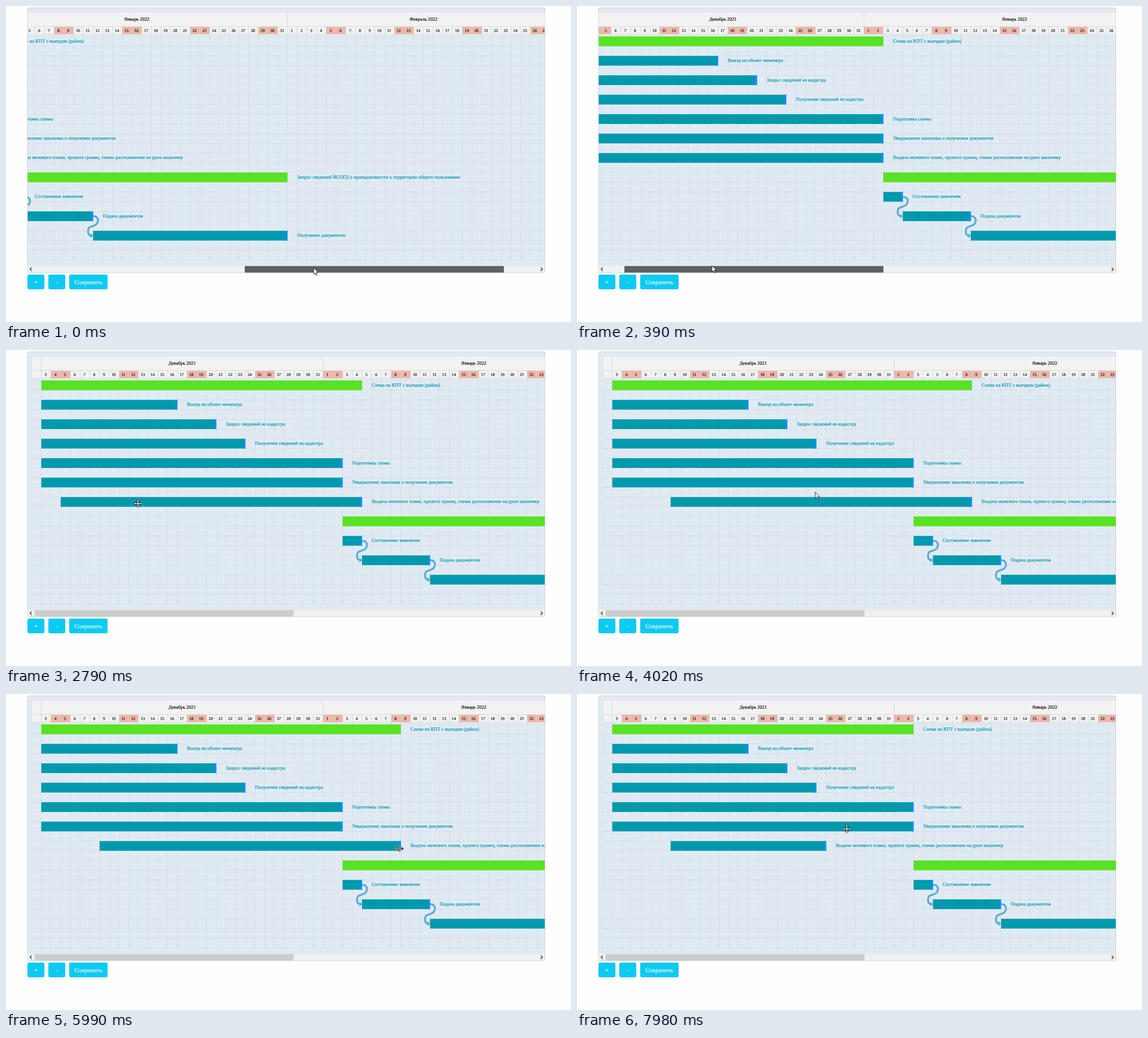
An HTML page for the animation above (8 s loop, 1001 by 560 pixels).

```html
<!DOCTYPE html>
<html lang="ru">
<head>
<meta charset="utf-8">
<title>Диаграмма работ</title>
<style>
html, body { margin: 0; width: 100%; height: 100%; overflow: hidden; background: #fefefe; }
svg { display: block; font-family: "Liberation Serif", "Times New Roman", serif; text-rendering: geometricPrecision; }
.month, .day, .button text { text-anchor: middle; stroke-width: .15; }
.month, .day { stroke: #000; }
.month { font-size: 8.4px; }
.day { font-size: 7.3px; }
.label { font-size: 8.6px; fill: #0097ab; stroke: #0097ab; stroke-width: .2; }
.head { fill: #f2f2f2; stroke: #cfd3d6; stroke-width: .6; }
.off { fill: #efb5a8; }
.grid { fill: none; stroke: #cfd8e0; stroke-width: .6; }
.task { fill: #0099ad; }
.group { fill: #57e223; }
.grip { fill: #0a91f6; }
.link { fill: none; stroke: #5cadd4; stroke-width: 3.4; }
.tip { fill: #5cadd4; }
.button rect { fill: #0dcaf2; }
.button text { font-size: 10.9px; fill: #fff; stroke: #fff; }
.chevron { fill: none; stroke: #505050; stroke-width: 1.5; }
#arrow, #move { fill: #fff; stroke: #000; stroke-width: .8; }
#resize { fill: #fff; mix-blend-mode: difference; }
</style>
</head>
<body>
<svg width="1001" height="560" viewBox="0 0 1001 560">
  <clipPath id="view"><rect x="38.5" y="3" width="916" height="458"/></clipPath>
  <rect x="38.2" y="3.2" width="916.4" height="469.6" rx="2.5" fill="#e1eaf3" stroke="#c8cbce" stroke-width=".9"/>
  <g clip-path="url(#view)"><g id="chart"></g></g>
  <rect x="38.6" y="460.6" width="915.6" height="11.8" fill="#f1f1f1"/>
  <rect id="thumb" y="460.8" width="459" height="11.6"/>
  <path class="chevron" d="M45.6 463.6L42.6 466.6L45.6 469.6M947.4 463.6L950.4 466.6L947.4 469.6"/>
  <g id="buttons"></g>
  <path id="arrow" d="M0 0V11.4L2.6 9L4.5 13.2L6.3 12.4L4.4 8.3H7.9Z"/>
  <path id="move" d="M0-7.2L2.8-4.4H1V-1H4.4V-2.8L7.2 0L4.4 2.8V1H1V4.4H2.8L0 7.2L-2.8 4.4H-1V1H-4.4V2.8L-7.2 0L-4.4-2.8V-1H-1V-4.4H-2.8Z"/>
  <path id="resize" d="M-.7-5.5H.7V5.5H-.7ZM-7.5 0L-4.3-3V-.6H-2V.6H-4.3V3ZM7.5 0L4.3-3V-.6H2V.6H4.3V3Z"/>
</svg>
<script>
const LOOP = 8000, DAY = 17.22, LEFT = 62.5, TOP = 54, DAYS = 92;
const $ = id => document.getElementById(id);
const clamp = (v, lo, hi) => Math.max(lo, Math.min(hi, v));
const dayX = d => LEFT + d * DAY;
const rowY = r => TOP + r * DAY * 2;

function set(el, attrs) {
  for (const k in attrs) el.setAttribute(k, attrs[k]);
}
function add(parent, tag, attrs, text) {
  const el = document.createElementNS("http://www.w3.org/2000/svg", tag);
  set(el, attrs);
  if (text) el.textContent = text;
  parent.append(el);
  return el;
}

const chart = $("chart");

// Grid and calendar header
let lines = "";
for (let d = -1; d <= DAYS; d++) lines += `M${dayX(d)} 50V450`;
for (let r = 0; r <= 23; r++) lines += `M${dayX(-1)} ${TOP + r * DAY}H${dayX(DAYS)}`;
add(chart, "path", { class: "grid", d: lines });

function monthCell(from, to, name) {
  add(chart, "rect", { class: "head", x: dayX(from), y: 10.8, width: (to - from) * DAY, height: 25.8 });
  if (name) add(chart, "text", { class: "month", x: dayX((from + to) / 2), y: 26 }, name);
}
function dayCell(d, date) {
  const off = date && date.getDay() % 6 == 0;
  add(chart, "rect", { class: off ? "head off" : "head", x: dayX(d), y: 36.6, width: DAY, height: 13.4 });
  if (date) add(chart, "text", { class: "day", x: dayX(d + .45), y: 46 }, String(date.getDate()));
}
const names = { 11: "Декабрь", 0: "Январь", 1: "Февраль", 2: "Март" };
const dateOf = d => new Date(2021, 11, 3 + d, 12);
monthCell(-1, 0);
dayCell(-1);
for (let d = 0, from = 0; d < DAYS; d++) {
  const date = dateOf(d);
  dayCell(d, date);
  if (dateOf(d + 1).getDate() == 1 || d == DAYS - 1) {
    monthCell(from, d + 1, `${names[date.getMonth()]} ${date.getFullYear()}`);
    from = d + 1;
  }
}

// Tasks: name, first day, end day, group flag
const tasks = [
  ["Схема на КПТ с выездом (район)", 0, 31, true],
  ["Выезд на объект инженера", 0, 14],
  ["Запрос сведений из кадастра", 0, 18],
  ["Получение сведений из кадастра", 0, 21],
  ["Подготовка схемы", 0, 31],
  ["Уведомление заказчика о получении документов", 0, 31],
  ["Выдача межевого плана, проекта границ, схемы расположения на руки заказчику", 0, 31],
  ["Запрос сведений ИСОГД о принадлежности к территории общего пользования", 31, 60, true],
  ["Составление заявления", 31, 33],
  ["Подача документов", 33, 40],
  ["Получение документов", 40, 60]
];
const bars = tasks.map(([name, from, to, group], r) => {
  const y = rowY(r);
  const bar = add(chart, "rect", { class: group ? "group" : "task", y, height: DAY });
  const grip = group ? null : add(chart, "rect", { class: "grip", y, width: 3.4, height: DAY });
  const label = add(chart, "text", { class: "label", y: y + 10.8 }, name);
  const place = (a, b) => {
    set(bar, { x: dayX(a), width: (b - a) * DAY });
    if (grip) set(grip, { x: dayX(b) - 3.4 });
    set(label, { x: dayX(b + 1) });
  };
  place(from, to);
  return place;
});

for (const r of [8, 9]) {
  const g = add(chart, "g", { transform: `translate(${dayX(tasks[r][2])} ${rowY(r) + 8.6})` });
  add(g, "path", { class: "link", d: "M0 0C9 0 10 7 7.6 12C4 20-8 15-8.8 25C-9.4 31-7.5 34-3.5 34.5" });
  add(g, "path", { class: "tip", d: "M-4.4 30L.2 34.5L-4.4 39Z" });
}

let left = 38;
for (const [text, width] of [["+", 30], ["-", 30], ["Сохранить", 68]]) {
  const g = add($("buttons"), "g", { class: "button" });
  add(g, "rect", { x: left, y: 476, width, height: 26, rx: 2.4 });
  add(g, "text", { x: left + width / 2, y: 492.8 }, text);
  left += width + 7;
}

// Pointer moves: first step, last step, number of steps, goal, shape
const home = [545, 464];
const moves = [
  [120, 390, 3, 239, 460, "arrow"],
  [540, 1090, 4, 177, 459, "arrow"],
  [1370, 2080, 6, 187, 284, "arrow"],
  [2220, 2360, 2, 192, 271, "move"],
  [2640, 2780, 2, 234, 272, "move"],
  [2920, 3600, 6, 312, 273, "move"],
  [3750, 4010, 3, 422, 251.5, "arrow"],
  [4140, 4270, 2, 560, 236, "arrow"],
  [4400, 4650, 3, 704, 268, "arrow"],
  [4800, 5190, 4, 702, 274, "arrow"],
  [5470, 5990, 4, 697, 274, "resize"],
  [6420, 7380, 8, 415, 277, "resize"],
  [7530, 7530, 1, 411, 278, "resize"],
  [7680, 7830, 2, 455, 256, "arrow"],
  [7980, 7980, 1, 478, 239, "move"]
];

function pointerAt(t) {
  let [x, y] = home, shape = "arrow";
  for (const [a, b, n, goalX, goalY, kind] of moves) {
    if (t < a) break;
    const done = b > a ? Math.floor((t - a) / (b - a) * (n - 1) + 1e-6) + 1 : n;
    const k = Math.min(1, done / n);
    x += (goalX - x) * k;
    y += (goalY - y) * k;
    shape = kind;
  }
  return { x, y, shape };
}

function draw(now) {
  const t = now % LOOP;
  const { x, y, shape } = pointerAt(t);
  const dragX = (a, b) => pointerAt(clamp(t, a, b)).x;

  const offset = Math.max(0, 597 + (dragX(0, 1090) - home[0]) * 1.776);
  set(chart, { transform: `translate(${-offset} 0)` });
  set($("thumb"), { x: 50.5 + offset * .624, fill: t < 1090 ? "#606060" : "#cdcdcd" });

  // Dragged bars snap to whole days
  const from = Math.floor((dragX(2600, 3600) - 192) / DAY);
  const to = from + 31 + Math.min(0, Math.round((dragX(6300, 7530) - 663) / DAY));
  bars[6](from, to);
  bars[0](0, Math.max(31, to));

  for (const id of ["arrow", "move", "resize"])
    set($(id), { transform: `translate(${x} ${y})`, visibility: id == shape ? "visible" : "hidden" });
}

const start = performance.now();
function tick() {
  draw(performance.now() - start);
  requestAnimationFrame(tick);
}
tick();
</script>
</body>
</html>
```
